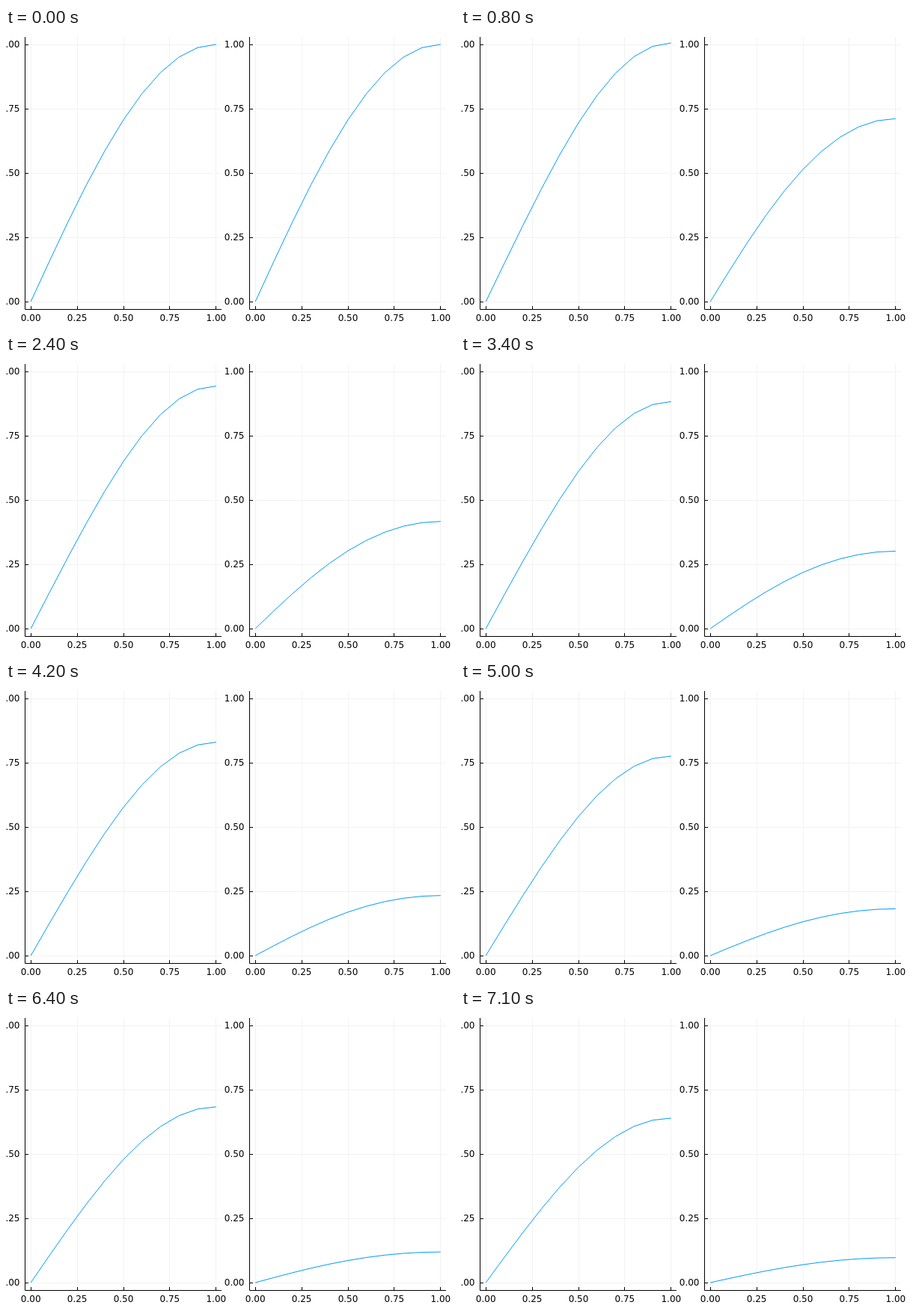
Animation of 600 by 400 pixels, one loop 7.2 s. Source, as an HTML page with a canvas:

```html
<!DOCTYPE html>
<html lang="en">
<head>
<meta charset="utf-8">
<title>Reaction and diffusion</title>
<style>
  html, body { margin: 0; width: 100%; height: 100%; overflow: hidden; background: #fff; }
  canvas { display: block; }
</style>
</head>
<body>
<canvas id="stage" width="600" height="400"></canvas>
<script>
const ctx = document.getElementById('stage').getContext('2d');
const FRAMES = 72, FRAME_MS = 100;
const CELLS = 10, DX = 1 / CELLS;
const DIFF_U = 0.31, DIFF_V = 0.635;
const TICKS = [0, 0.25, 0.5, 0.75, 1];
const PANELS = [0, 300];

const toX = value => 33.2 + 247.6 * value;
const toY = value => 366 - 344 * value;
const snap = p => Math.floor(p) + 0.5;

// The solver's first steps are longer than the later ones.
const simTime = n => 0.01395 * n + 0.0249 * (1 - Math.exp(-n / 1.5));

function advance({ u, v }, dt) {
  const bend = (f, i) => (f[i - 1] - 2 * f[i] + f[i + 1]) / (DX * DX);
  const nextU = u.slice(), nextV = v.slice();
  for (let i = 1; i < CELLS; i++) {
    const reaction = u[i] * v[i];
    nextU[i] += dt * (DIFF_U * bend(u, i) + reaction);
    nextV[i] += dt * (DIFF_V * bend(v, i) - reaction);
  }
  // Zero slope at the right end.
  for (const f of [nextU, nextV]) f[CELLS] = (4 * f[CELLS - 1] - f[CELLS - 2]) / 3;
  return { u: nextU, v: nextV };
}

function simulate() {
  const start = Array.from({ length: CELLS + 1 }, (_, i) => Math.sin(Math.PI * i * DX / 2));
  let state = { u: start, v: start };
  const states = [state];
  for (let n = 1; n < FRAMES; n++) {
    const span = simTime(n) - simTime(n - 1);
    const steps = Math.ceil(span / 0.0002);
    for (let k = 0; k < steps; k++) state = advance(state, span / steps);
    states.push(state);
  }
  return states;
}

function stroke(points, color, width = 1) {
  ctx.beginPath();
  points.forEach(([x, y]) => ctx.lineTo(x, y));
  ctx.strokeStyle = color;
  ctx.lineWidth = width;
  ctx.stroke();
}

function drawPanel(left, values) {
  ctx.save();
  ctx.translate(left, 0);
  for (const t of TICKS) {
    const x = snap(toX(t)), y = snap(toY(t));
    stroke([[x, 12], [x, 376]], '#f2f2f2');
    stroke([[26, y], [288, y]], '#f2f2f2');
  }
  stroke([[25.5, 12], [25.5, 376.5], [288, 376.5]], '#000');
  ctx.fillStyle = '#000';
  ctx.font = '12px "DejaVu Sans", sans-serif';
  for (const t of TICKS) {
    const x = snap(toX(t)), y = snap(toY(t));
    stroke([[x, 372], [x, 376]], '#000');
    stroke([[26, y], [30, y]], '#000');
    ctx.textAlign = 'center';
    ctx.fillText(t.toFixed(2), toX(t), 392);
    ctx.textAlign = 'right';
    ctx.fillText(t.toFixed(2), 18.5, toY(t) + 4.4);
  }
  stroke(values.map((value, i) => [toX(i * DX), toY(value)]), '#009afa');
  ctx.restore();
}

function drawAxisName() {
  ctx.save();
  ctx.translate(280, 194);
  ctx.rotate(-Math.PI / 2);
  ctx.font = '16px "DejaVu Sans", sans-serif';
  ctx.textAlign = 'center';
  ctx.fillText('v', 0, 0);
  ctx.restore();
}

const states = simulate();

function render(now) {
  const { u, v } = states[Math.floor(now / FRAME_MS) % FRAMES];
  ctx.fillStyle = '#fff';
  ctx.fillRect(0, 0, 600, 400);
  drawPanel(PANELS[0], u);
  drawPanel(PANELS[1], v);
  drawAxisName();
}

const startTime = performance.now();
function tick() {
  render(performance.now() - startTime);
  requestAnimationFrame(tick);
}
tick();
</script>
</body>
</html>
```
